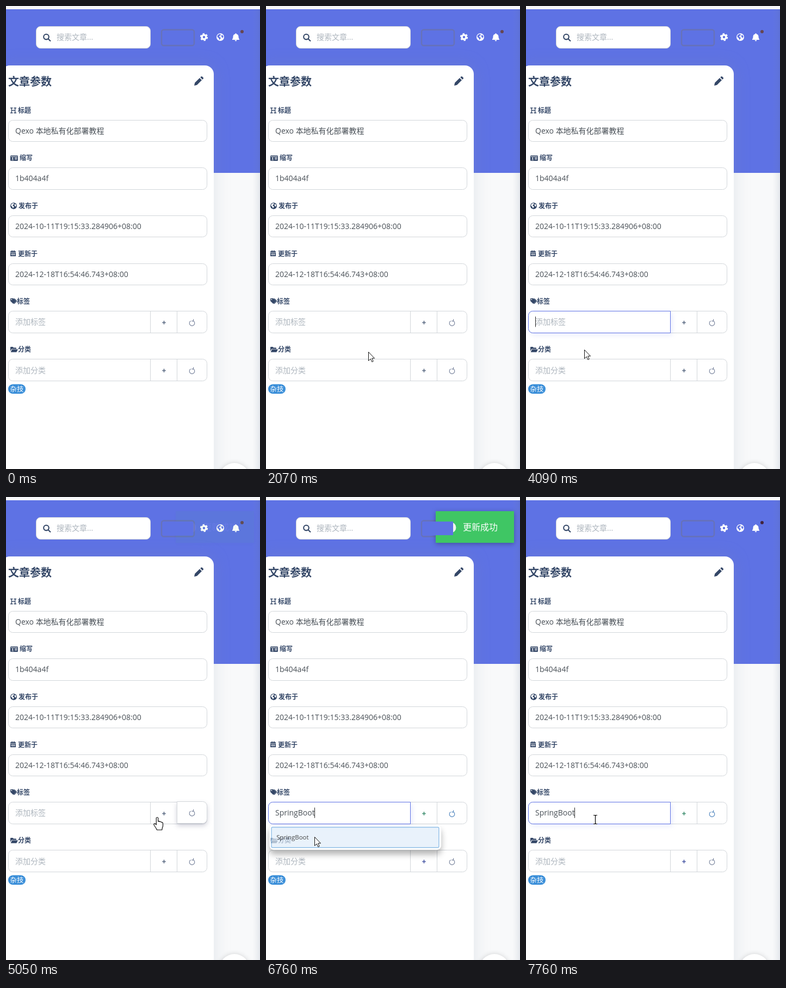
Animation of 467 by 849 pixels, one loop 8000 ms. Source, as an HTML page:

```html
<!DOCTYPE html>
<html lang="zh">
<head>
<meta charset="utf-8">
<style>
  html, body { margin: 0; width: 100%; height: 100%; overflow: hidden; background: #f8f9fa; }
  svg { display: block; width: 467px; height: 849px; --plus: #5a6a82; --turn: #75809a; --catPlus: #5a6a82; }
  text { font: 14px "Open Sans", "Noto Sans CJK SC", "Noto Sans CJK", sans-serif; fill: #495057; }
  .label { font-size: 12px; font-weight: 700; fill: #344767; }
  .title { font-size: 20px; font-weight: 700; fill: #344767; }
  .hint { fill: #adb5bd; }
  .box { fill: #fff; stroke: #d2d6da; }
  .dark { fill: #344767; }
  .line { fill: none; stroke: #344767; }
  .gap { fill: none; stroke: #fff; }
  .focus { fill: #fff; stroke: #5e72e4; filter: drop-shadow(3px 4px 4px rgba(94, 114, 228, .13)); }
  .lift .box { filter: drop-shadow(0 4px 4px rgba(50, 50, 93, .22)); }
  .glyph { fill: none; stroke-width: 1.6; }
  .turn { stroke-width: 1.1; }
</style>
</head>
<body>
<svg id="stage" viewBox="0 0 467 849">
  <defs>
    <linearGradient id="edge"><stop offset="0" stop-color="#8898aa" stop-opacity="0"/><stop offset="1" stop-color="#5a6a8a" stop-opacity=".13"/></linearGradient>
    <g id="globe">
      <circle r="7"/>
      <path fill="var(--land)" d="M-4.8-3.6L-1.5-5.8 1.2-4.8-.2-2.6-2.4-1.8-1 .3 1 1.2 0 3.2-1.6 5.2-2.6 2.2-5.6-.5zM3-4.6L5.6-1.6 4.8 1.8 2.6.2 1.8-2z"/>
    </g>
    <path id="turn" class="glyph turn" d="M2.4-4.1A4.8 4.8 0 1 1-2.4-4.1M2.6-7.2V-3.9H-.8"/>
    <path id="plus" class="glyph" d="M-3.3 0H3.3M0-3.3V3.3"/>
    <path id="field" d="M265.5 559.5V599.5H12.5a8 8 0 0 1-8-8V567.5a8 8 0 0 1 8-8z"/>
  </defs>

  <rect width="467" height="849" fill="#f8f9fa"/>
  <rect y="6" width="467" height="300" fill="#5e72e4"/>
  <rect x="453" y="6" width="14" height="843" fill="url(#edge)"/>
  <rect x="-9" y="109" width="391" height="790" rx="16" fill="#fff" style="filter:drop-shadow(0 0 15px rgba(136,152,170,.2))"/>
  <circle cx="420" cy="866" r="28" fill="#fff" style="filter:drop-shadow(0 0 4px rgba(0,0,0,.16))"/>

  <rect class="box" x="55.5" y="37.5" width="210" height="40" rx="8"/>
  <g class="line" stroke-width="2.1"><circle cx="74" cy="56.6" r="4.8"/><path d="M77.6 60.2L82 64.6"/></g>
  <text class="hint" x="93" y="62">搜索文章...</text>
  <rect x="286" y="43.5" width="60" height="29" rx="4" fill="none" stroke="#6772b8" stroke-width="2.4"/>
  <g transform="translate(364 57)" fill="none" stroke="#fff">
    <circle r="3.9" stroke-width="3.4"/><circle r="6" stroke-width="2.4" stroke-dasharray="3.2 3.083"/>
  </g>
  <use href="#globe" x="394" y="57" fill="#fff" style="--land:#5e72e4"/>
  <path transform="translate(422.5 57)" fill="#fff" d="M0-7q1 0 1 1.2q4 1 4 5.3q0 3 1.5 4.5v1h-13v-1q1.5-1.5 1.5-4.5q0-4.3 4-5.3q0-1.2 1-1.2zM-1.8 5.5h3.6q0 2-1.8 2t-1.8-2z"/>
  <circle id="dot" cx="434" cy="47" r="3"/>

  <text class="title" x="4" y="146">文章参数</text>
  <path class="dark" d="M346 146l1.2-5.2 8.8-8.8 4 4-8.8 8.8zM357.2 130.8l1.4-1.4q1.1-1 2.2 0l1.8 1.8q1 1.1 0 2.2l-1.4 1.4z"/>
  <g id="form"></g>

  <path class="line" stroke-width="1.3" d="M8 187h4.500M14.500 187H19M8 196h4.500M14.500 196H19M10.300 187v9M16.700 187v9M10.300 191.500h6.400"/>
  <rect class="dark" x="8" y="274" width="14" height="10" rx="1.5"/>
  <path class="gap" stroke-width="1.2" d="M9 276h12M16 278.700h4.500M16 281h4.500"/>
  <path fill="#fff" d="M10 282.500q2.200-3.200 4.400 0z"/><circle cx="12.200" cy="279" r="1.200" fill="#fff"/>
  <use href="#globe" class="dark" transform="translate(14 366.500) scale(.86)" style="--land:#fff"/>
  <path class="dark" d="M9 449.500h1.500V448H12v1.500h2V448h1.500v1.500H17q1 0 1 1v7.500q0 1-1 1H9q-1 0-1-1v-7.500q0-1 1-1z"/>
  <path class="gap" stroke-width=".8" d="M8 452.200h10M9 455.500h8M11.300 453v5.500M14.700 453v5.500"/>
  <path class="dark" d="M8 537q0-1 1-1h4.500l5 5-5 5.300-5.500-5.300z"/>
  <circle cx="10.300" cy="538.300" r="1" fill="#fff"/>
  <path class="line" stroke-width="1.300" d="M15.200 536.500l4.300 4.500-4.500 5"/>
  <path class="dark" d="M8 626q0-1 1-1h3.500l1.500 1.500h4q1 0 1 1v1.200h-8.500L8 633zM11.300 629.500H22l-2.700 5.300H8.600z"/>

  <rect x="4" y="693.500" width="32" height="17.500" rx="8.700" fill="#3b8fd9"/>
  <text x="7.500" y="707" style="font-size:12.500px;font-weight:500;fill:#fff">杂技</text>

  <g id="liftPlus" class="lift">
    <rect class="box" x="265.500" y="559.500" width="49" height="40"/>
    <use href="#plus" x="290.500" y="580.500" stroke="var(--plus)"/>
  </g>
  <g id="liftTurn" class="lift">
    <path class="box" d="M314.500 559.500H361.500a8 8 0 0 1 8 8V591.500a8 8 0 0 1-8 8H314.500z"/>
    <use href="#turn" x="342" y="581" stroke="var(--turn)"/>
  </g>
  <use id="focusTag" href="#field" class="focus"/>
  <use id="focusCat" href="#field" y="88" class="focus"/>
  <text id="tagText" x="17" y="584"></text>
  <text class="hint" x="17" y="672.500">添加分类</text>
  <rect id="caret" width="1" height="19" fill="#222"/>

  <g id="menu">
    <rect x="4" y="601" width="320.500" height="46.500" rx="8" fill="#fff" style="filter:drop-shadow(0 8px 6px rgba(0,0,0,.42))"/>
    <rect id="menuHover" x="7.700" y="605.200" width="312.500" height="37.800" rx="2" fill="#e1eefa" stroke="#68a8df" stroke-width="1.400"/>
    <text x="17" y="628" style="font-size:11.600px;fill:#000">SpringBoot</text>
  </g>

  <g id="toast">
    <rect x="312" y="26" width="144" height="58" fill="#3fc664" style="filter:drop-shadow(0 2px 4px rgba(0,0,0,.3))"/>
    <circle cx="339.500" cy="56" r="10" fill="#eef3ee"/>
    <rect x="287.500" y="45" width="56.500" height="25" fill="#5e72e4"/>
    <text x="362" y="61" style="font-size:16px;fill:#fff">更新成功</text>
  </g>

  <g id="cursor" stroke-linejoin="round">
    <path id="arrow" fill="#fff" stroke="#111" d="M.5.500V16.500L4.200 13 6.800 18.600 9.200 17.500 6.700 12H11.500z"/>
    <path id="hand" fill="#fff" stroke="#111" stroke-width="1.200" d="M-1.700 1.500Q0-1 1.700 1.500V8Q3.200 6.800 4.700 8.500 6.200 7.500 7.500 9.500 10.300 8.800 10.500 12V16.500Q9 20 8.700 23.500H-.5Q-2 20-5 16-7 13-5.500 12-3.500 11.500-1.700 14z"/>
    <path id="beam" transform="translate(.5 .5)" fill="none" stroke="#000" stroke-width="1.200" d="M-3.500-8H-1L0-7 1-8H3.500M0-7V7M-3.500 8H-1L0 7 1 8H3.500"/>
  </g>
</svg>

<script>
const LOOP = 8000;
const $ = id => document.getElementById(id);
const clamp = v => Math.max(0, Math.min(1, v));
const smooth = v => v * v * (3 - 2 * v);
const pulse = (t, on, off, ramp = 150) => clamp((t - on) / ramp) - clamp((t - off) / ramp);
const show = (id, alpha) => $(id).setAttribute("opacity", alpha);

// label, label x, box top, box height, value
const fields = [
  ["标题", 22, 209, 39, "Qexo 本地私有化部署教程"],
  ["缩写", 25, 296, 40, "1b404a4f"],
  ["发布于", 23, 384, 39, "2024-10-11T19:15:33.284906+08:00"],
  ["更新于", 22, 472, 39, "2024-12-18T16:54:46.743+08:00"],
  ["标签", 20, 559, 40],
  ["分类", 22, 647, 40]
];
$("form").innerHTML = fields.map(([label, x, y, height, value], i) => `
  <text class="label" x="${x}" y="${y - 13}">${label}</text>
  <rect class="box" x="4.5" y="${y + .5}" width="365" height="${height}" rx="8"/>` +
  (value ? `<text x="17" y="${y + 25}">${value}</text>` : `
  <path class="box" d="M265.5 ${y}v41M314.5 ${y}v41"/>
  <use href="#plus" x="290.5" y="${y + 21.5}" stroke="var(--${i === 4 ? "plus" : "catPlus"})"/>
  <use href="#turn" x="342" y="${y + 22.5}" stroke="${i === 4 ? "var(--turn)" : "#75809a"}"/>`)
).join("");

// time, x, y of the pointer's hot spot
const visits = [
  [[380, 319, 839], [530, 200, 626], [710, 200, 626], [920, 228, 850]],
  [[1710, 297, 845], [2200, 165, 590], [2510, 150, 574], [2530, 150, 574], [2970, 131, 676],
   [3130, 262, 684], [3310, 123, 682], [3360, 123, 682], [3540, 97, 569], [3680, 97, 569],
   [3790, 258, 686], [3910, 100, 632], [4060, 100, 632], [4320, 290, 588], [4600, 345, 588],
   [4880, 342, 586], [5050, 278, 587], [5300, 215, 585], [5540, 131, 585], [5910, 128, 585],
   [6090, 128, 585], [6560, 89, 623], [6760, 89, 623], [7150, 120, 594], [7400, 127, 591], [LOOP, 127, 591]]
];

function pointerAt(t) {
  const path = visits.find(p => t >= p[0][0] && t < p[p.length - 1][0]);
  if (!path) return null;
  const i = path.findIndex(p => p[0] > t);
  const [t0, x0, y0] = path[i - 1], [t1, x1, y1] = path[i];
  const k = smooth((t - t0) / (t1 - t0));
  return [x0 + (x1 - x0) * k, y0 + (y1 - y0) * k].map(Math.round);
}

function shapeAt(x, y, menuOpen) {
  if (menuOpen && y > 601) return "arrow";
  const inRow = (y > 559 && y < 600) || (y > 647 && y < 688);
  return !inRow ? "arrow" : x < 266 ? "beam" : "hand";
}

function draw(t) {
  const pointer = pointerAt(t);
  const menu = pulse(t, 5570, 6720);
  show("cursor", pointer ? 1 : 0);
  if (pointer) {
    const shape = shapeAt(...pointer, t > 5570 && t < 6800);
    $("cursor").setAttribute("transform", `translate(${pointer})`);
    for (const id of ["arrow", "hand", "beam"]) show(id, id === shape ? 1 : 0);
  }

  const tagFocus = pulse(t, 2400, 3000) + pulse(t, 3690, 4400) + pulse(t, 5400, 9000);
  const catFocus = pulse(t, 3010, 3690);
  show("focusTag", tagFocus);
  show("focusCat", catFocus);

  const lifts = { liftPlus: pulse(t, 4280, 4450) + pulse(t, 5060, 5180), liftTurn: pulse(t, 4740, 5400) };
  for (const id in lifts) {
    show(id, lifts[id]);
    $(id).setAttribute("transform", `translate(0 ${-lifts[id]})`);
  }

  const hovering = t >= 6330;
  const tag = $("tagText");
  tag.textContent = hovering ? "SpringBoot" : "添加标签";
  tag.setAttribute("class", hovering ? "" : "hint");

  const phase = t < 3010 ? 2400 : t < 3690 ? 3010 : t < 5400 ? 3690 : t < 6700 ? 5910 : 6755;
  const blinkOn = (t - phase + LOOP) % 1000 < 500;
  show("caret", blinkOn && (tagFocus > .1 || catFocus > .1) ? 1 : 0);
  $("caret").setAttribute("x", hovering ? 89 : 17);
  $("caret").setAttribute("y", catFocus > .5 ? 658 : 569.5);

  const scale = 1 - .055 * (1 - menu);
  show("menu", menu);
  show("menuHover", hovering ? 1 : 0);
  $("menu").setAttribute("transform", `translate(164 624) scale(${scale}) translate(-164 -624)`);

  show("toast", pulse(t, 5035, 7050, 300));
  $("dot").setAttribute("fill", t > 7050 ? "#42243c" : "#664653");
  const style = $("stage").style;
  style.setProperty("--plus", t > 5200 ? "#3f8f70" : "#5a6a82");
  style.setProperty("--turn", t > 5200 ? "#4c83bd" : "#75809a");
  style.setProperty("--catPlus", t > 5200 ? "#4a59a5" : "#5a6a82");
}

const start = performance.now();
function tick() {
  draw((performance.now() - start) % LOOP);
  requestAnimationFrame(tick);
}
tick();
</script>
</body>
</html>
```
